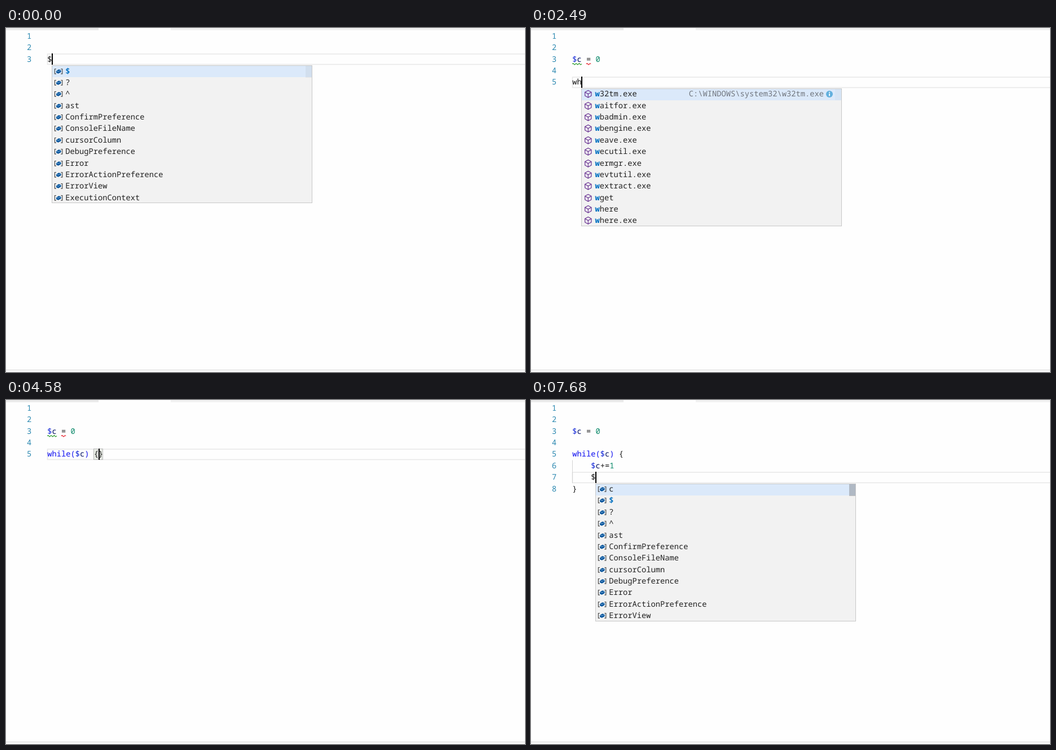
These frames come from a looping animation (920x609 px, 8 s). An HTML page with a canvas:

```html
<!DOCTYPE html>
<html lang="en">
<head>
<meta charset="utf-8">
<style>
  html, body { margin: 0; width: 100%; height: 100%; overflow: hidden; background: #fefefe; }
  canvas { display: block; }
</style>
</head>
<body>
<canvas id="stage" width="920" height="609"></canvas>
<script>
const ctx = document.getElementById('stage').getContext('2d');
const LOOP = 8000, CHAR = 8.25, LEFT = 73.3, TOP = 4.6, LINE = 20.38, POPUP_WIDTH = 462;
const FONT = '13.75px "Noto Sans Mono", monospace';

const variables = ['$', '?', '^', 'ast', 'ConfirmPreference', 'ConsoleFileName', 'cursorColumn',
  'DebugPreference', 'Error', 'ErrorActionPreference', 'ErrorView', 'ExecutionContext'];
const filtered = ['c', 'cursorColumn', 'ConfirmPreference', 'ConsoleFileName',
  'CurrentlyExecutingCommand', 'Cert', 'PSCmdlet', 'PSCommandPath', 'PSCulture', 'HKCU',
  'LogCommandHealthEvent', 'LogCommandLifecycleEvent', 'LogEngineHealthEvent'];
const programs = ['w32tm.exe', 'waitfor.exe', 'wbadmin.exe', 'wbengine.exe', 'weave.exe',
  'wecutil.exe', 'wermgr.exe', 'wevtutil.exe', 'wextract.exe', 'wget', 'where', 'where.exe'];
const loops = ['while', 'do-while', 'whoami.exe', 'powershell_ise.exe', 'Switch-Certificate',
  'Get-WheaMemoryPolicy', 'Set-WheaMemoryPolicy'];

// Completion lists: rows, highlighted prefix, scrollbar height, icon.
const popups = {
  first: { rows: variables, match: '$', bar: 21 },
  firstC: { rows: filtered.slice(1), match: '', bar: 36 },
  all: { rows: ['c', ...variables.slice(0, 11)], match: '$', bar: 21 },
  onlyC: { rows: filtered.slice(0, 12), match: '', bar: 36 },
  exe: { rows: programs, match: 'w', bar: 20, cube: true, detail: 'C:\\WINDOWS\\system32\\w32tm.exe' },
  whi: { rows: loops, match: 'whi', bar: 0, cube: true },
  whil: { rows: loops.slice(0, 2), match: 'whil', bar: 0, cube: true }
};

const head = '\n\n$c = 0\n\n';
const body = head + 'while($c) {\n    ';
const body2 = body + '$c+=1\n    ';

// [start ms, text with | as the caret, options]
const steps = [
  [0, '\n\n$|', { popup: 'first', bar: .08 }],
  [80, '\n\n$c|', { popup: 'first', bar: .2, raw: true }],
  [160, '\n\n$c|', { popup: 'firstC', bar: .4, raw: true }],
  [390, '\n\n$c|'],
  [470, '\n\n$c |'],
  [700, '\n\n$c =|'],
  [780, '\n\n$c = |'],
  [1330, '\n\n$c = |', { blink: true }],
  [1630, '\n\n$c = 0|'],
  [1860, '\n\n$c = 0\n|'],
  [2020, head + '|'],
  [2330, head + 'w|'],
  [2410, head + 'w|', { popup: 'exe', bar: 0 }],
  [2490, head + 'wh|', { popup: 'exe', bar: .04 }],
  [2560, head + 'whi|', { popup: 'exe', bar: .2 }],
  [2640, head + 'whi|', { popup: 'whi' }],
  [2720, head + 'whil|', { popup: 'whil' }],
  [2800, head + 'while|', { raw: true }],
  [2950, head + 'while|'],
  [3110, head + 'while(|)', { pair: '()' }],
  [3340, head + 'while($|)', { pair: '()' }],
  [3420, head + 'while($|)', { pair: '()', popup: 'all', bar: .16 }],
  [3500, head + 'while($c|)', { pair: '()', popup: 'all', bar: .4, raw: true }],
  [3650, head + 'while($c|)', { pair: '()', popup: 'onlyC', bar: .4 }],
  [3960, head + 'while($c)|', { pair: '()' }],
  [4260, head + 'while($c) |', { pair: '()' }],
  [4340, head + 'while($c) |'],
  [4500, head + 'while($c) {|}'],
  [4580, head + 'while($c) {|}', { pair: '{}' }],
  [4730, body + '|\n}'],
  [5210, body + '|\n}', { blink: true }],
  [5510, body + '$|\n}'],
  [5590, body + '$|\n}', { popup: 'all', bar: .16 }],
  [5670, body + '$|\n}', { popup: 'all', bar: .4 }],
  [5820, body + '$c|\n}', { popup: 'all', bar: .4, raw: true }],
  [6130, body + '$c|\n}', { popup: 'onlyC', bar: .4 }],
  [6600, body + '$c+|\n}', { popup: 'onlyC', bar: .4 }],
  [6670, body + '$c+|\n}'],
  [6830, body + '$c+=|\n}'],
  [6980, body + '$c+=1|\n}'],
  [7150, body2 + '|\n}'],
  [7530, body2 + '$|\n}'],
  [7600, body2 + '$|\n}', { popup: 'all', bar: .1 }],
  [7680, body2 + '$|\n}', { popup: 'all', bar: .36 }]
];

const lineTop = row => TOP + row * LINE;
const codeBaseline = row => Math.floor(lineTop(row) + 14.75);
const colX = col => LEFT + col * CHAR;

function rect(x, y, w, h, color) {
  ctx.fillStyle = color;
  ctx.fillRect(x, y, w, h);
}

function frame(x, y, w, h, color, width = 1) {
  ctx.strokeStyle = color;
  ctx.lineWidth = width;
  ctx.strokeRect(x, y, w, h);
}

function text(str, x, y, color, bold) {
  ctx.font = (bold ? 'bold ' : '') + FONT;
  ctx.fillStyle = color;
  ctx.fillText(str, x, y);
}

function path(points, color, width, fill) {
  ctx.beginPath();
  points.forEach(([x, y]) => ctx.lineTo(x, y));
  if (fill) {
    ctx.fillStyle = color;
    ctx.fill();
  } else {
    ctx.strokeStyle = color;
    ctx.lineWidth = width;
    ctx.stroke();
  }
}

function squiggle(col, chars, color) {
  const x = colX(col), points = [];
  for (let d = 0; d <= chars * CHAR; d += .5)
    points.push([x + d, 63.8 - 1.1 * Math.sin(d * Math.PI / 2.7)]);
  path(points, color, 1.2);
}

function drawCode(line, row, raw) {
  const y = codeBaseline(row);
  for (const { 0: token, index } of line.matchAll(/while|\$c?|\d|[()]|[^\s]/g)) {
    const x = colX(index);
    if (token === '$c') {
      text('$', x, y, raw ? '#111' : '#1428d8');
      text('c', x + CHAR, y, '#001060');
    } else {
      const keyword = token === 'while' ? !raw : '()'.includes(token);
      const color = keyword ? '#1010f0' : /\d/.test(token) ? '#098868' : '#151515';
      text(token, x, y, color);
    }
  }
}

function variableIcon(x, y) {
  for (const [edge, dir] of [[x + 4.9, 1], [x + 18.2, -1]])
    path([[edge + dir * 2.5, y - 4.3], [edge, y - 4.3], [edge, y + 4.3], [edge + dir * 2.5, y + 4.3]], '#4a4a4a', 1.2);
  path([[x + 7.5, y - .8], [x + 12, y - 3.6], [x + 16, y - 2.4], [x + 16, y + 1.2],
    [x + 11, y + 4], [x + 7.5, y + 2.3]], '#00539c', 0, true);
  path([[x + 8, y - .8], [x + 11.2, y + .4], [x + 15.5, y - 2]], '#d5e4f2', .7);
}

function cubeIcon(x, y) {
  const cx = x + 11.5, w = 5.6, color = '#652d90';
  path([[cx, y - 6.3], [cx + w, y - 3.2], [cx + w, y + 3.2], [cx, y + 6.3],
    [cx - w, y + 3.2], [cx - w, y - 3.2], [cx, y - 6.3]], color, 1.2);
  path([[cx - w, y - 3.2], [cx, y], [cx + w, y - 3.2]], color, 1.1);
  path([[cx, y], [cx, y + 6.3]], color, 1.1);
}

function drawPopup({ rows, match, bar, cube, detail }, col, row, barAlpha = 0) {
  const exactX = colX(col), exactY = lineTop(row);
  const x = Math.floor(exactX), y = Math.ceil(exactY);
  const height = Math.floor(rows.length * LINE);
  const baseline = i => Math.floor(exactY + i * LINE + 15.3);

  rect(x, y, POPUP_WIDTH, height, '#f2f2f2');
  rect(x, y, POPUP_WIDTH, LINE + .6, '#dbe9fa');
  rect(x + POPUP_WIDTH - 12, y + 1, 11, bar, `rgba(100,100,100,${barAlpha})`);
  rows.forEach((label, i) => {
    const labelX = exactX + 23.6, labelY = baseline(i);
    (cube ? cubeIcon : variableIcon)(exactX, labelY - 4.2);
    const hit = label.startsWith(match) ? match : '';
    text(hit, labelX, labelY, '#0070c1', true);
    text(label.slice(hit.length), labelX + hit.length * CHAR, labelY, '#222');
  });
  if (detail) {
    const iconX = exactX + 439.2, iconY = baseline(0) - 4;
    text(detail, exactX + 429.2 - detail.length * CHAR, baseline(0), '#70757d');
    ctx.beginPath();
    ctx.arc(iconX, iconY, 6, 0, 2 * Math.PI);
    ctx.fillStyle = '#62b0de';
    ctx.fill();
    rect(iconX - .9, iconY - 3.8, 1.8, 1.8, '#fff');
    rect(iconX - .9, iconY - 1, 1.8, 4.5, '#fff');
  }
  frame(x + .5, y + .5, POPUP_WIDTH - 1, height - 1, '#c8c8c8');
}

function draw(t) {
  const [, source, options = {}] = steps.findLast(step => step[0] <= t);
  const before = source.split('|')[0].split('\n');
  const row = before.length - 1, col = before[row].length;
  const lines = source.replace('|', '').split('\n');
  const top = Math.round(lineTop(row) - .1);

  rect(0, 0, 920, 609, '#fefefe');
  rect(0, 0, 164, 4, '#ebebeb');
  rect(292, 0, 628, 4, '#f2f2f2');
  rect(0, 605, 920, 1, '#d4d4d4');
  frame(73.5, top + 1, 860, 18.5, '#e7e7e7', 1.5);

  for (const mark of options.pair || '') {
    const x = Math.floor(colX(lines[row].indexOf(mark)));
    rect(x, top + 1, 8, 19, '#e9ede6');
    frame(x + .5, top + .5, 7, 19, '#b9b9b9');
  }

  lines.forEach((line, i) => {
    text(String(i + 1), 37, codeBaseline(i), '#2b88b0');
    if (line.startsWith('    ')) rect(73, lineTop(i), 1, LINE, '#d3d3d3');
    drawCode(line, i, options.raw && i === row);
  });

  if (t >= 2020 && t < 6130) {
    squiggle(0, 2, '#2a9a2a');
    squiggle(3, 1, '#e8202a');
  }
  if (!options.blink) rect(Math.floor(colX(col)), top, 2, 20, '#000');
  if (options.popup) drawPopup(popups[options.popup], col, row + 1, options.bar);
}

ctx.textRendering = 'geometricPrecision';
const start = performance.now();
function tick() {
  draw((performance.now() - start) % LOOP);
  requestAnimationFrame(tick);
}
tick();
</script>
</body>
</html>
```
